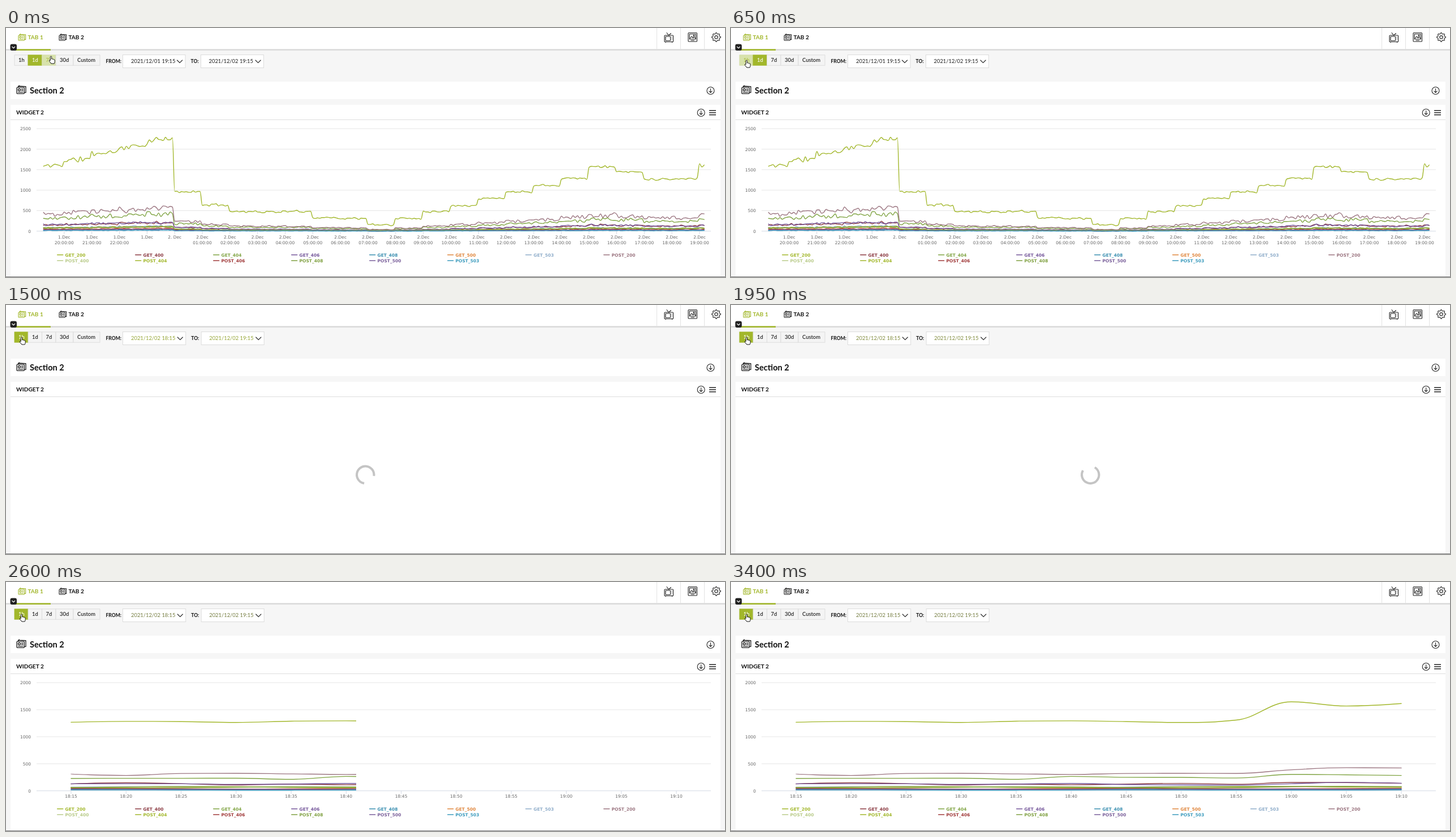
These frames come from a looping animation (1271 px wide and 441 px high, 3.55 s). An HTML page:

```html
<!DOCTYPE html>
<html lang="en">
<head>
<meta charset="utf-8">
<title>Dashboard time range</title>
<style>
  html, body { margin: 0; height: 100%; overflow: hidden; background: #f6f6f6; }
  svg { display: block; width: 100vw; height: 100vh; }
  text { font-family: Lato, "Open Sans", sans-serif; fill: #111; white-space: pre; }
  .b { font-weight: 700; }
  .chart text { font: 7.5px "DejaVu Sans", sans-serif; fill: #666; }
  .chart .legend { font-weight: 700; }
  .line { fill: none; stroke-width: 1.4; stroke-linejoin: round; stroke-linecap: round; }
  .icon { fill: none; stroke: #222; stroke-width: 1.1; stroke-linejoin: round; stroke-linecap: round; }
  .date { font-size: 9.4px; }
  .small { font-size: 8.6px; }
</style>
</head>
<body>
<svg id="stage" viewBox="0 0 1271 441">
  <defs>
    <clipPath id="reveal"><rect id="revealBox" x="54" y="165" width="0" height="215"/></clipPath>
    <g id="pages">
      <rect x=".5" y="2.5" width="10.5" height="9" rx="1"/>
      <path d="M2.5 2.5V.8l10.7.6v8.5H11M4 .8V0"/>
      <circle cx="4" cy="6" r="1.6"/>
      <path d="M7.2 5H9M7.2 7H9M2.5 9.5H9"/>
    </g>
    <g id="down">
      <circle r="6.5"/>
      <path d="M0-3.4V3.2M-2.6.8L0 3.4 2.6.8"/>
    </g>
  </defs>

  <!-- header -->
  <rect width="1271" height="38" fill="#fff"/>
  <rect y="37.3" width="1271" height="2.5" fill="#d9d9d9"/>
  <rect x="14" y="37.3" width="65" height="2.6" fill="#a2b72b"/>
  <path d="M1150.5 0V37M1192.5 0V37M1234.5 0V37" stroke="#e2e2e2"/>
  <use href="#pages" class="icon" style="stroke:#a2b72b" transform="translate(21.5 10.5)"/>
  <text class="b" x="38.5" y="20" font-size="10.1" style="fill:#a2b72b">TAB 1</text>
  <use href="#pages" class="icon" transform="translate(93.5 10.5)"/>
  <text class="b" x="110.5" y="20" font-size="10.1">TAB 2</text>
  <rect x="7.5" y="28.5" width="11.5" height="11.5" rx="3" fill="#222"/>
  <path d="M10.5 33l2.8 2.6L16 33" fill="none" stroke="#fff" stroke-width="1.2"/>
  <g class="icon">
    <rect x="1164" y="13" width="15.5" height="11.5" rx="1"/>
    <rect x="1166" y="15" width="8.5" height="7.5" rx="1"/>
    <path d="M1168 8.5l3.5 4.5 4-3.5M1177 16v.2M1177 19v.2M1166 24.5v1M1177.5 24.5v1"/>
    <rect x="1206" y="8.5" width="15.5" height="15.5" rx="1"/>
    <rect x="1208.3" y="10.8" width="11" height="9"/>
    <path d="M1208.5 19l3.5-4 2.5 2.5 2-2 2.8 3.5M1211 22h5.5"/>
    <circle cx="1216" cy="13.2" r="1"/>
    <circle cx="1255.5" cy="16.3" r="2.7"/>
    <path id="gear"/>
  </g>

  <!-- toolbar -->
  <g id="ranges"></g>
  <text class="b small" x="176.5" y="62">FROM:</text>
  <rect id="fromBox" x="206.5" y="47.5" width="110.5" height="23" fill="#fff" stroke="#dcdcdc"/>
  <text id="from" class="date" x="221" y="62"></text>
  <g id="right">
    <path class="icon" d="M302.5 57l4.6 4.6 4.6-4.6"/>
    <text class="b small" x="326.5" y="62">TO:</text>
    <rect x="344.5" y="47.5" width="111" height="23" fill="#fff" stroke="#dcdcdc"/>
    <text id="to" class="date" x="358.5" y="62">2021/12/02 19:15</text>
    <path class="icon" d="M441 57l4.6 4.6 4.6-4.6"/>
  </g>

  <!-- panels -->
  <rect x="8" y="95" width="1255" height="31" fill="#fff"/>
  <use href="#pages" class="icon" stroke-width=".9" transform="translate(18.5 102) scale(1.25)"/>
  <text class="b" x="42" y="115.5" font-size="14.6">Section 2</text>
  <use href="#down" class="icon" transform="translate(1245.5 111)"/>
  <rect x="8" y="136" width="1255" height="305" fill="#fff"/>
  <path d="M8 162.5H1263" stroke="#dedede"/>
  <text class="b" x="18" y="152.8" font-size="10.2">WIDGET 2</text>
  <use href="#down" class="icon" transform="translate(1228.7 150)"/>
  <path d="M1243 146.2h12M1243 150h12M1243 153.8h12" stroke="#222" stroke-width="1.5"/>

  <g id="day" class="chart"></g>
  <g id="hour" class="chart"></g>
  <circle id="spinner" cx="635.3" cy="300.7" r="15.2" fill="none" stroke="#c4c4c4" stroke-width="4"
    pathLength="360" stroke-dasharray="270 90"/>
  <path d="M0 440.5H1271" stroke="#808080"/>
  <path id="hand" fill="#fff" stroke="#111" stroke-width="1" stroke-linejoin="round"
    d="M2.8 8V1.8a1.2 1.2 0 0 1 2.4 0V5.5q1.2-.7 2 .3 1.3-.5 1.9.5 1.6-.2 1.6 1.5V10q0 2-1 3.5H4.4L1 9.2Q.4 7.9 1.5 7.6z"/>
</svg>

<script>
const LOOP = 3550, STEP = 50;
const CLICK = 950, SPIN = 1200, SHOW = 2050;
const DRAW = { start: 2073, length: 1090 };
const PLOT = { left: 54, right: 1246 };

const $ = id => document.getElementById(id);
const clamp = v => Math.max(0, Math.min(1, v));
const easeSine = v => (1 - Math.cos(Math.PI * clamp(v))) / 2;
const mix = (a, b, v) => a + (b - a) * v;

function add(parent, tag, attrs, text) {
  const node = document.createElementNS("http://www.w3.org/2000/svg", tag);
  for (const key in attrs) node.setAttribute(key, attrs[key]);
  if (text !== undefined) node.textContent = text;
  parent.appendChild(node);
  return node;
}

function random(seed) {
  return () => {
    seed = (seed + 0x6D2B79F5) | 0;
    let n = Math.imul(seed ^ seed >>> 15, 1 | seed);
    n = n + Math.imul(n ^ n >>> 7, 61 | n) ^ n;
    return ((n ^ n >>> 14) >>> 0) / 4294967296;
  };
}

// name, colour, share of the main series
const SERIES = [
  ["GET_200", "#a2b72b", 1],
  ["GET_400", "#8b3a42", .093],
  ["GET_404", "#7fa342", .19],
  ["GET_406", "#74569a", .097],
  ["GET_408", "#3a8fb0", .02],
  ["GET_500", "#e0873e", .045],
  ["GET_503", "#8fadca", .054],
  ["POST_200", "#9b7580", .255],
  ["POST_400", "#b9cb8a", .048],
  ["POST_404", "#a2b72b", .05],
  ["POST_406", "#a03a3a", .028],
  ["POST_408", "#7fa040", .047],
  ["POST_500", "#7a5f9a", .018],
  ["POST_503", "#3b9bbd", .01]
];

// main series, mean of each hour from 19:00
const HOURS = [1590, 1740, 1910, 2060, 2220, 960, 640, 480, 470, 480, 330, 310, 155,
  310, 480, 630, 800, 960, 1120, 1290, 1570, 1450, 1270, 1280, 1610];

// values every five minutes in the last hour
const LAST = {
  GET_200: [1268, 1284, 1280, 1264, 1288, 1294, 1280, 1264, 1308, 1645, 1568, 1614],
  POST_200: [308, 284, 320, 324, 313, 302, 320, 324, 322, 388, 427, 422],
  GET_404: [227, 232, 232, 233, 212, 266, 250, 248, 237, 304, 295, 284],
  GET_406: [130, 130, 130, 119, 124, 137, 116, 110, 106, 130, 156, 140],
  GET_400: [127, 149, 132, 108, 123, 112, 124, 138, 122, 154, 152, 138]
};

function lastHour([name, , share], n) {
  return LAST[name] || Array.from({ length: 12 }, (_, i) =>
    1350 * share * (1 + .16 * Math.sin(i * 1.1 + n * 2) + (i > 8 ? .12 : 0)));
}

function dayValues(series, n) {
  const rand = random(n * 97 + 11), share = series[2], end = lastHour(series, n);
  return Array.from({ length: 288 }, (_, k) => {
    if (k >= 276) return end[k - 276];
    const minute = 15 + 5 * k, h = Math.floor(minute / 60);
    const rise = h < 5 ? 60 * (minute % 60 / 60 - .4) : 0;
    const noise = (rand() + rand() - 1) * (n ? HOURS[h] * share * .17 + 4 : h < 5 ? 85 : 32);
    return (HOURS[h] + rise) * share + noise;
  });
}

// smooth curve whose handles never overshoot the neighbouring points
function spline(points) {
  let d = "M" + points[0], out = points[0];
  for (let i = 1; i < points.length; i++) {
    const [x, y] = points[i], [px, py] = points[i - 1], next = points[i + 1];
    let into = [x, y], leave = [x, y];
    if (next) {
      const [nx, ny] = next;
      let lx = (1.5 * x + px) / 2.5, ly = (1.5 * y + py) / 2.5;
      let rx = (1.5 * x + nx) / 2.5, ry = (1.5 * y + ny) / 2.5;
      const fix = (ry - ly) * (rx - x) / (rx - lx) + y - ry;
      ly += fix;
      ry += fix;
      const lim = Math.max(Math.min(py, y), Math.min(Math.max(py, y), ly));
      if (lim !== ly) { ly = lim; ry = 2 * y - ly; }
      const cap = Math.max(Math.min(ny, y), Math.min(Math.max(ny, y), ry));
      if (cap !== ry) { ry = cap; ly = 2 * y - ry; }
      into = [lx, ly];
      leave = [rx, ry];
    }
    d += "C" + [...out, ...into, x, y].map(v => v.toFixed(2)).join(" ");
    out = leave;
  }
  return d;
}

function chart(root, { base, max, x0, dx, values, clip }) {
  const top = 178.3, toY = v => base - v / max * (base - top);
  for (let v = 0; v <= max; v += 500) {
    const y = toY(v);
    add(root, "path", { d: `M${PLOT.left} ${y}H${PLOT.right}`, stroke: v ? "#e6e6e6" : "#d3d9e4" });
    add(root, "text", { x: 44, y: y + 2.9, "text-anchor": "end" }, v);
  }
  const lines = add(root, "g", clip ? { "clip-path": "url(#reveal)" } : {});
  SERIES.forEach((s, n) => {
    const pts = values(s, n).map((v, i) => [x0 + i * dx, toY(v)]);
    add(lines, "path", { class: "line", stroke: s[1], d: spline(pts) });
    const x = 90 + n % 8 * 138, y = n < 8 ? 401.7 : 412;
    add(root, "path", { class: "line", stroke: s[1], d: `M${x + .7} ${y}h10` });
    add(root, "text", { class: "legend", x: x + 14.6, y: y + 2.8, style: `fill:${s[1]}` }, s[0]);
  });
}

function label(root, x, base, y, ...rows) {
  add(root, "path", { d: `M${x} ${base}v5`, stroke: "#d3d9e4" });
  rows.forEach((row, i) => add(root, "text", { x, y: y + i * 9.6, "text-anchor": "middle" }, row));
}

const pad = n => String(n).padStart(2, "0");
const HOUR_W = 48.83;

chart($("day"), { base: 359.8, max: 2500, x0: 66.3, dx: HOUR_W / 12, values: dayValues });
for (let i = 0; i < 24; i++) {
  const h = (20 + i) % 24, x = 102.9 + i * HOUR_W;
  if (i === 4) label($("day"), x, 360, 373, "2. Dec");
  else if (i === 3) label($("day"), x, 360, 373, "1.Dec");
  else label($("day"), x, 360, 373, i < 4 ? "1.Dec" : "2.Dec", pad(h) + ":00:00");
}

chart($("hour"), { base: 369.8, max: 2000, x0: 115, dx: 97.27, values: lastHour, clip: true });
for (let i = 0; i < 12; i++) {
  const m = 15 + 5 * i;
  label($("hour"), 115 + i * 97.27, 370, 382.3, 18 + Math.floor(m / 60) + ":" + pad(m % 60));
}

// gear outline: eight teeth
$("gear").setAttribute("d", "M" + Array.from({ length: 32 }, (_, i) => {
  const a = (i - .5) * Math.PI / 16, r = i % 4 < 2 ? 7.8 : 6;
  return (1255.5 + r * Math.sin(a)).toFixed(1) + " " + (16.3 - r * Math.cos(a)).toFixed(1);
}).join("L") + "Z");

// range buttons: label, left, right, text x
const RANGES = [["1h", 15, 39, 22], ["1d", 39, 63.5, 46], ["7d", 63.5, 88, 70.5],
  ["30d", 88, 119, 95], ["Custom", 119, 166, 126]].map(([name, left, right, x]) => ({
  left, right,
  box: add($("ranges"), "rect", { x: left, y: 47.8, width: right - left, height: 18.4, "stroke-width": .8 }),
  text: add($("ranges"), "text", { x, y: 60.3, "font-size": 9.4, "font-weight": 500 }, name)
}));
const LOOKS = {
  idle: ["#f4f4f4", "#d8d8d8", "#111"],
  hover: ["#d8e2ab", "#d3dca8", "#a9bd3c"],
  active: ["#a2b72b", "#a2b72b", "#fff"]
};

// hand position: time, x, y
const PATH = [[0, 75.5, 49.5], [400, 25, 57.6], [550, 25, 57.6], [650, 23.5, 56.5], [LOOP, 23.5, 56.5]];

function handAt(t) {
  const i = PATH.findIndex(p => p[0] > t), a = PATH[i - 1], b = PATH[i];
  const v = easeSine((t - a[0]) / (b[0] - a[0]));
  return [mix(a[1], b[1], v), mix(a[2], b[2], v)];
}

const show = (node, on) => node.setAttribute("visibility", on ? "visible" : "hidden");

function render(t) {
  const clicked = t >= CLICK, [x, y] = handAt(t);
  $("hand").setAttribute("transform", `translate(${x} ${y})`);

  RANGES.forEach((r, i) => {
    const over = x + 3.5 >= r.left && x + 3.5 < r.right;
    const look = LOOKS[i === (clicked ? 0 : 1) ? "active" : over ? "hover" : "idle"];
    r.box.setAttribute("fill", look[0]);
    r.box.setAttribute("stroke", look[1]);
    r.text.style.fill = look[2];
  });

  // changed dates flash green, then settle
  const fade = clamp((t - SPIN) / 1000);
  const ink = clicked
    ? `rgb(${mix(162, 118, fade)},${mix(181, 126, fade)},${mix(48, 66, fade)})` : "#222";
  $("from").textContent = clicked ? "2021/12/02 18:15" : "2021/12/01 19:15";
  $("from").style.fill = $("to").style.fill = ink;
  $("fromBox").setAttribute("width", clicked ? 111.2 : 110.5);
  $("right").setAttribute("transform", `translate(${clicked ? .7 : 0} 0)`);

  show($("day"), !clicked);
  show($("spinner"), clicked && t < SHOW);
  show($("hour"), t >= SHOW);
  const turn = -37 + Math.max(0, t - SPIN) * .45;
  $("spinner").setAttribute("transform", `rotate(${turn} 635.3 300.7)`);
  $("revealBox").setAttribute("width",
    (PLOT.right - PLOT.left) * easeSine((t - DRAW.start) / DRAW.length));
}

const begin = performance.now();
function tick() {
  const t = (performance.now() - begin) % LOOP;
  render(Math.floor(t / STEP) * STEP);
  requestAnimationFrame(tick);
}
tick();
</script>
</body>
</html>
```
